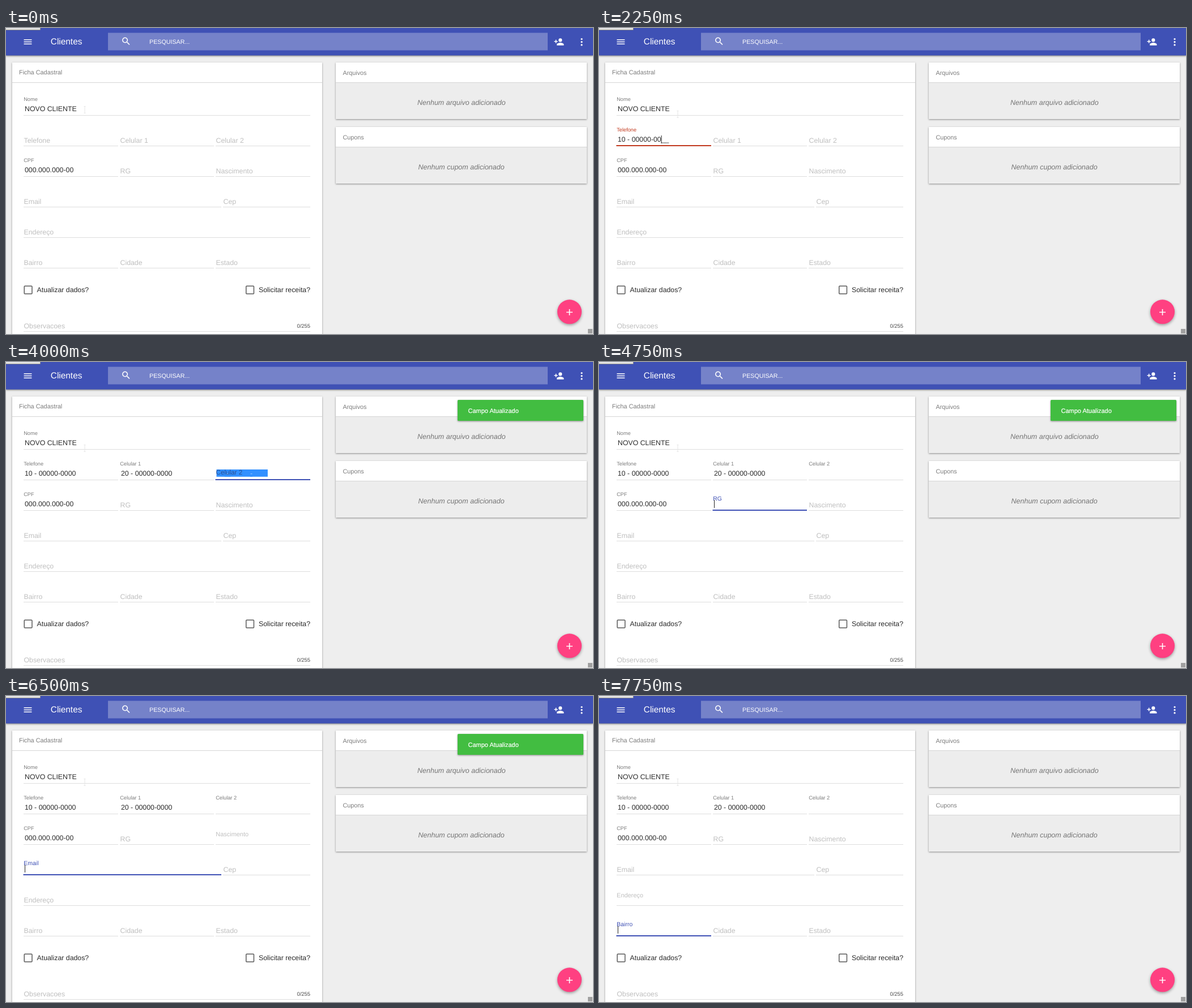
Animation of 1036x541 px, one loop 8000 ms. Source, as an HTML page:

```html
<!DOCTYPE html>
<html lang="pt-BR">
<head>
<meta charset="utf-8">
<title>Clientes</title>
<style>
html, body { margin: 0; width: 100%; height: 100%; overflow: hidden; background: #eee; }
svg { display: block; width: 100vw; height: 100vh; }
text { font-family: "Liberation Sans", Arial, sans-serif; text-rendering: geometricPrecision; white-space: pre; }
.card { filter: drop-shadow(0 1px 1.5px rgba(0,0,0,.42)); }
.bar { filter: drop-shadow(0 1px 1.5px rgba(0,0,0,.5)); }
.fab { filter: drop-shadow(0 2px 2.5px rgba(0,0,0,.36)); }
</style>
</head>
<body>
<svg id="stage" viewBox="0 0 1036 541" xmlns="http://www.w3.org/2000/svg"></svg>
<script>
const LOOP = 8000;
const SIZE = 12.32, SMALL = 9.24, MEDIUM = 10.8;
const INDIGO = '#3f51b5', WARN = '#c23a1f', INK = '#2b2b2b', MUTED = '#7c7c7c', HINT = '#bfbfbf';

const rect = (x, y, w, h, fill, more = '') =>
  `<rect x="${x}" y="${y}" width="${w}" height="${h}" fill="${fill}" ${more}/>`;
const text = (x, y, size, fill, str, more = '') =>
  `<text x="${x}" y="${y}" font-size="${size}" fill="${fill}" ${more}>${str}</text>`;
const icon = (cx, cy, d) =>
  `<path fill="#fff" transform="translate(${cx - 9.24} ${cy - 9.24}) scale(.77)" d="${d}"/>`;
const mix = (a, b, p) => a + (b - a) * p;

// name: [left, right, underline y]
const fields = {
  'Nome': [31, 537, 154],
  'Telefone': [31, 198, 208], 'Celular 1': [201, 367, 208], 'Celular 2': [370, 537, 208],
  'CPF': [31, 198, 262], 'RG': [201, 367, 262], 'Nascimento': [370, 537, 262],
  'Email': [31, 380, 316], 'Cep': [383, 537, 316],
  'Endereço': [31, 537, 370],
  'Bairro': [31, 198, 424], 'Cidade': [201, 367, 424], 'Estado': [370, 537, 424],
  'Observacoes': [31, 537, 536]
};

const MASK = '__ - _____-____';
const phones = {
  'Telefone': { full: '10 - 00000-0000', done: 2500 },
  'Celular 1': { full: '20 - 00000-0000', done: 3750 },
  'Celular 2': { full: '', done: 4500 }
};

// on: focused field, p: label rise, n: digits typed, back: label sinking after blur
const steps = [
  { t: 0 },
  { t: 250, on: 'Nome', caret: 1 },
  { t: 750, on: 'Nome' },
  { t: 1250, on: 'Telefone', p: .2, n: 0, sel: 1 },
  { t: 1500, on: 'Telefone', n: 1, caret: 1 },
  { t: 1750, on: 'Telefone', n: 3, caret: 1 },
  { t: 2000, on: 'Telefone', n: 6, caret: 1 },
  { t: 2250, on: 'Telefone', n: 9, caret: 1 },
  { t: 2500, on: 'Telefone', n: 11, caret: 1 },
  { t: 2750, on: 'Celular 1', p: .2, n: 0, sel: 1 },
  { t: 3000, on: 'Celular 1', n: 1, caret: 1 },
  { t: 3250, on: 'Celular 1', n: 4, caret: 1 },
  { t: 3500, on: 'Celular 1', n: 8, caret: 1 },
  { t: 3750, on: 'Celular 1', n: 11, caret: 1 },
  { t: 4000, on: 'Celular 2', p: .2, n: 0, sel: 1 },
  { t: 4250, on: 'Celular 2', n: 0, sel: 1 },
  { t: 4500, on: 'CPF', sel: 1 },
  { t: 4750, on: 'RG', p: .6, caret: 1 },
  { t: 5000, on: 'RG', caret: 1 },
  { t: 5250, on: 'Nascimento', p: .6, part: 0, back: 'RG' },
  { t: 5500, on: 'Nascimento', part: 1 },
  { t: 6250, on: 'Nascimento', part: 2 },
  { t: 6500, on: 'Email', p: .6, caret: 1, back: 'Nascimento' },
  { t: 6750, on: 'Cep', p: .6, caret: 1, back: 'Email' },
  { t: 7000, on: 'Cep', caret: 1 },
  { t: 7250, on: 'Endereço', p: .6, caret: 1, back: 'Cep' },
  { t: 7500, on: 'Endereço', caret: 1 },
  { t: 7750, on: 'Bairro', p: .6, caret: 1, back: 'Endereço' }
];

const widthOf = str => [...str].reduce((sum, c) =>
  sum + ({ ' ': .278, '.': .278, '-': .333 }[c] || .556), 0) * SIZE;

// Length of the masked string up to the caret after n digits
function caretIndex(n) {
  let i = 0;
  for (let k = 0; k < n; i++) if (MASK[i] === '_') k++;
  return i;
}

function valueOf(name, s) {
  if (name === 'Nome') return 'NOVO CLIENTE';
  if (name === 'CPF') return '000.000.000-00';
  const phone = phones[name];
  if (!phone) return '';
  if (s.on === name) {
    const i = caretIndex(s.n);
    return phone.full.slice(0, i) + MASK.slice(i);
  }
  return s.t >= phone.done ? phone.full : '';
}

function dateParts(x, y, part) {
  const parts = [['DD', 3, 18], ['MM', 25.5, 21], ['YYYY', 51, 33.5]];
  let out = '';
  parts.forEach(([str, dx, w], i) => {
    if (i === part) out += rect(x + dx - .5, y - 18.5, w, 15, '#b2d3fb');
    out += text(x + dx, y - 7, SIZE, INK, str);
  });
  out += text(x + 21.5, y - 7, SIZE, INK, '/') + text(x + 47.3, y - 7, SIZE, INK, '/');
  out += rect(508, 242, 11, 18, '#efefef');
  return out + '<path fill="#333" d="M510.5 248.5l3-3.5 3 3.5zM510.5 253.5l3 3.5 3-3.5z"/>' +
    '<path fill="#111" d="M522.5 247.5h9l-4.5 7.5z"/>';
}

function drawField(name, s) {
  const [x, right, y] = fields[name];
  const on = s.on === name;
  const value = valueOf(name, s);
  const wrong = on && s.n > 0 && s.n < 11;
  const accent = wrong ? WARN : INDIGO;
  const floated = value || (phones[name] && s.t >= phones[name].done);
  const p = on ? s.p ?? 1 : s.back === name ? .45 : floated ? 1 : 0;

  let out = on ? rect(x - .5, y - 1, right - x + .5, 2, accent) : rect(x, y, right - x, 1, '#dedede');

  if (on && s.sel) {
    out += rect(x + 1.5, y - 18, widthOf(value), 13, '#3390ff');
    out += text(x + 2, y - 7, SIZE, '#fff', value, p < 1 ? 'opacity=".5"' : '');
  } else if (value) {
    out += text(x + 2, y - 7, SIZE, INK, value);
  }
  if (on && s.part !== undefined) out += dateParts(x, y, s.part);
  if (on && s.caret) {
    const w = name === 'Nome' ? 92.5 : s.n ? widthOf(value.slice(0, caretIndex(s.n))) : 0;
    out += rect(x + 2 + w, y - 18, 1, 14, '#222');
  }

  const tint = on ? (p < .3 ? 'rgba(40,55,105,.72)' : accent) : p === 1 ? MUTED : HINT;
  return out + text(x + .5 - p * .3, mix(y - 5.5, y - 24.6, p), mix(SIZE, SMALL, p), tint, name);
}

function ibeam(y) {
  return `<path d="M137.5 ${y}h3M139 ${y}v12M137.5 ${y + 12}h3" stroke="#e6e6e6" fill="none"/>`;
}

function panel(y, title, note, noteX) {
  return `<g class="card">${rect(582, y, 443, 100, '#ededed')}${rect(582, y, 443, 36, '#fff')}</g>` +
    rect(582, y + 35, 443, 1, '#d6d6d6') +
    text(594.5, y + 22.3, MEDIUM, MUTED, title) +
    text(noteX, y + 75.3, 12.5, '#757575', note, 'font-style="italic"');
}

function checkbox(x, labelX, label) {
  return rect(x + .75, 456.25, 13.7, 13.7, 'none', 'rx="1" stroke="#5a5a5a" stroke-width="1.5"') +
    text(labelX, 467, SIZE, INK, label);
}

function backdrop() {
  return rect(0, 0, 1036, 541, '#eee') +
    `<g class="bar">${rect(0, 0, 1036, 48.5, INDIGO)}</g>` +
    rect(180, 8.5, 776, 31, '#7582c9') +
    '<path d="M0 0H61V2.5Q61 4 59.5 4H0z" fill="#8b8b8b"/>' + rect(0, 0, 60, 3, '#e4e4e4') +
    icon(38.5, 24.5, 'M3 18h18v-2H3zm0-5h18v-2H3zm0-7v2h18V6z') +
    icon(212, 23.5, 'M15.5 14h-.79l-.28-.27A6.47 6.47 0 0 0 16 9.5 6.5 6.5 0 1 0 9.5 16c1.61 0 3.09-.59 4.23-1.57l.27.28v.79l5 4.99L20.49 19zm-6 0C7 14 5 12 5 9.5S7 5 9.5 5 14 7 14 9.5 12 14 9.5 14z') +
    icon(976, 24.5, 'M15 12a4 4 0 1 0 0-8 4 4 0 0 0 0 8zM6 10V7H4v3H1v2h3v3h2v-3h3v-2zm9 4c-2.67 0-8 1.34-8 4v2h16v-2c0-2.66-5.33-4-8-4z') +
    [19.5, 24.7, 29.9].map(y => `<circle cx="1016" cy="${y}" r="1.6" fill="#fff"/>`).join('') +
    text(78.8, 29.3, 15.4, '#fff', 'Clientes') +
    text(253, 27.8, 10.7, '#fff', 'PESQUISAR...') +
    `<g class="card">${rect(11, 61, 547, 500, '#fff')}</g>` +
    rect(11, 96, 547, 1, '#d6d6d6') +
    text(23, 82.3, MEDIUM + .1, MUTED, 'Ficha Cadastral') +
    panel(61, 'Arquivos', 'Nenhum arquivo adicionado', 726) +
    panel(175, 'Cupons', 'Nenhum cupom adicionado', 727.5) +
    checkbox(31.5, 54.5, 'Atualizar dados?') +
    checkbox(423, 446, 'Solicitar receita?') +
    text(537, 530.3, SMALL + .2, '#4a4a4a', '0/255', 'text-anchor="end"') +
    '<circle class="fab" cx="994.5" cy="501.8" r="21.5" fill="#ff4081"/>' +
    '<path d="M989 502.5h11M994.5 497v11" stroke="#fff" stroke-width="1.6"/>' +
    rect(1027, 532, 8, 8, '#a0a0a0');
}

function toast(opacity) {
  return `<g opacity="${opacity}"><g class="card">${rect(797, 67, 222, 37, '#42bd41', 'rx="1.5"')}</g>` +
    text(815.5, 89.6, 11, '#fff', 'Campo Atualizado', 'stroke="#fff" stroke-width=".2"') + '</g>';
}

const stage = document.getElementById('stage');
stage.innerHTML = backdrop() + '<g id="live"></g>';
const live = document.getElementById('live');
let shown;

function render(time) {
  const s = steps.findLast(step => step.t <= time);
  if (s === shown) return;
  shown = s;
  let out = Object.keys(fields).map(name => drawField(name, s)).join('');
  out += ibeam(s.t < 250 ? 138.5 : 146.5);
  if (s.t >= 3750 && s.t < 7500) out += toast(s.t < 4000 ? .6 : 1);
  live.innerHTML = out;
}

const start = performance.now();
function tick() {
  render((performance.now() - start) % LOOP);
  requestAnimationFrame(tick);
}
tick();
</script>
</body>
</html>
```
